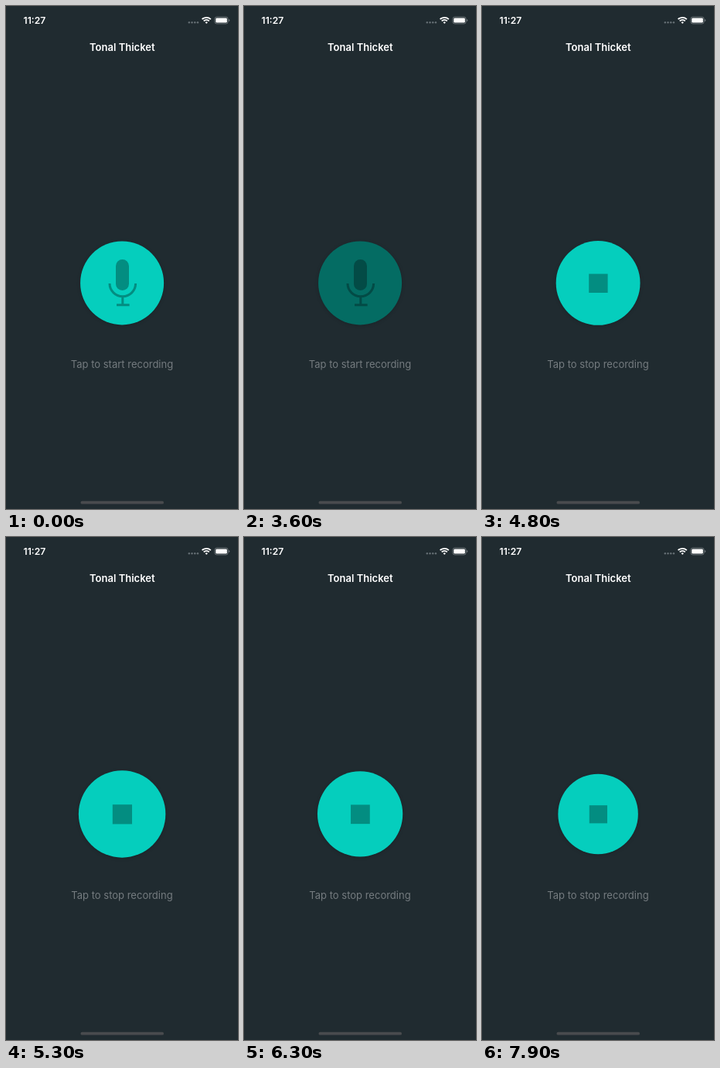
An HTML page that plays this animation: 300 px wide and 649 px high, repeating every 8000 ms.

```html
<!DOCTYPE html>
<html lang="en">
<head>
<meta charset="utf-8">
<title>Recorder</title>
<style>
  html, body { margin: 0; width: 100%; height: 100%; overflow: hidden; background: #202b30; }
  svg { display: block; width: 100%; height: 100%; }
  text { font-family: Inter, Roboto, "Liberation Sans", sans-serif; }
  #disc { fill: #05cebd; filter: drop-shadow(0 1.5px 2px rgba(0, 0, 0, .18)); }
  #button { --icon: #038d81; }
  #button.pressed { --icon: #034b46; }
  #button.pressed #disc { fill: #046c63; }
  #stop, .solid { fill: var(--icon); }
  .line { fill: none; stroke: var(--icon); stroke-width: 3; }
</style>
</head>
<body>
<svg viewBox="0 0 300 649">
  <rect width="300" height="649" fill="#202b30"/>

  <!-- status bar -->
  <text x="22.5" y="23" font-size="12.2" font-weight="600" fill="#fff">11:27</text>
  <g fill="#667075">
    <circle cx="236.8" cy="21.3" r="1.2"/>
    <circle cx="240.5" cy="21.3" r="1.2"/>
    <circle cx="244.2" cy="21.3" r="1.2"/>
    <circle cx="247.9" cy="21.3" r="1.2"/>
  </g>
  <g fill="none" stroke="#fff" stroke-width="1.9">
    <path d="M253.6 17.1a8.2 8.2 0 0 1 11.2 0"/>
    <path d="M255.7 19.4a5.1 5.1 0 0 1 7 0"/>
  </g>
  <path d="M257.5 21.1a2.5 2.5 0 0 1 3.4 0L259.2 22.9z" fill="#fff"/>
  <rect x="269.9" y="14.1" width="17.2" height="8.8" rx="2.6" fill="none" stroke="#7c8387" stroke-width=".8"/>
  <rect x="271.2" y="15.4" width="14.6" height="6.2" rx="1.4" fill="#fff"/>
  <path d="M288.2 17v3a1.6 1.6 0 0 0 0-3z" fill="#7c8387"/>

  <text x="150.3" y="57.5" font-size="13" font-weight="600" fill="#fff" text-anchor="middle">Tonal Thicket</text>

  <g id="button">
    <circle id="disc" cx="150.1" cy="357.4" r="54"/>
    <g id="mic">
      <rect class="solid" x="142" y="327" width="17" height="40" rx="8.5"/>
      <path class="line" d="M134 358a16.8 16.8 0 0 0 33.6 0M150.8 375v11M143 385.7h16.6"/>
    </g>
    <rect id="stop" x="138.3" y="345.7" width="24.2" height="24.2"/>
  </g>

  <text id="label" x="150" y="466.6" font-size="13" fill="#747b7f" text-anchor="middle">Tap to start recording</text>
  <rect x="96.5" y="638.8" width="107.5" height="3.8" rx="1.9" fill="#494b4e"/>
</svg>
<script>
  const LOOP = 8000, STEP = 100;
  const PRESS = 3600, RELEASE = 3700, RECORD = 3800;
  const PERIOD = 578, SWING = 0.049;
  const [button, mic, stop, label] =
    ["button", "mic", "stop", "label"].map(id => document.getElementById(id));

  function draw(t) {
    const recording = t >= RECORD;
    const phase = (t - RECORD - 3) / PERIOD * 2 * Math.PI;
    const scale = recording ? 1 - SWING * Math.cos(phase) : 1;
    button.setAttribute("transform",
      `translate(150.1 357.4) scale(${scale}) translate(-150.1 -357.4)`);
    button.classList.toggle("pressed", t >= PRESS && t < RELEASE);
    mic.style.display = recording ? "none" : "";
    stop.style.display = recording ? "" : "none";
    label.textContent = `Tap to ${recording ? "stop" : "start"} recording`;
  }

  function tick() {
    draw(Math.floor(performance.now() % LOOP / STEP) * STEP);
    requestAnimationFrame(tick);
  }
  tick();
</script>
</body>
</html>
```
